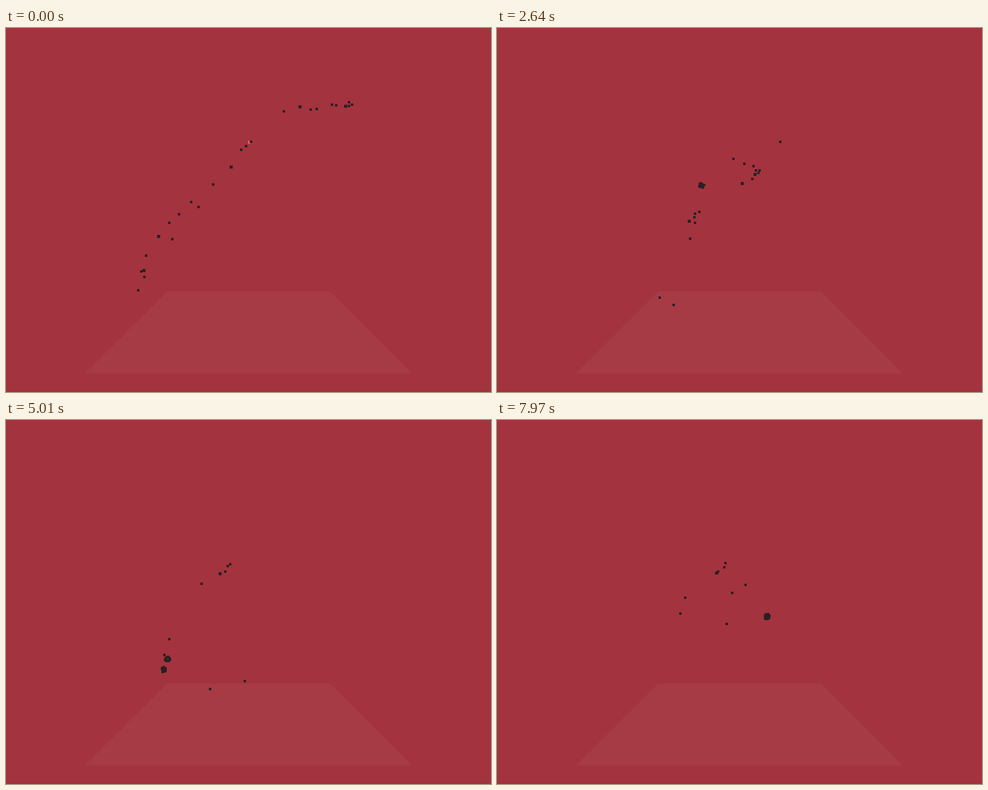
An HTML page with a canvas for the animation above (8 s loop, 796x598 px).

```html
<!DOCTYPE html>
<html lang="en">
<head>
<meta charset="utf-8">
<title>Swarm</title>
<style>
  html, body { margin: 0; width: 100%; height: 100%; overflow: hidden; background: #a3333e; }
  canvas { display: block; }
</style>
</head>
<body>
<canvas width="796" height="598"></canvas>
<script>
const ctx = document.querySelector('canvas').getContext('2d');
const LOOP = 8;
const BEATS = [0, 2.02, 3.23, 4, 4.9, 6.07, 7.97];

// Each group trails behind its head along `spread` and gathers within `settle` seconds.
const groups = [
  { // lead swarm
    count: 8, spread: [-172, 215], bunching: 2, settle: 2.8, orbit: 3.5,
    path: [[400, 187], [355, 226], [311, 297], [261, 359], [254, 408], [351, 378], [444, 322]]
  },
  { // tail swarm
    count: 9, spread: [-114, 9], bunching: 2.5, settle: 4.4, orbit: 3.5, swing: 30,
    path: [[566, 126], [485, 200], [366, 272], [282, 320], [262, 388], [344, 392], [444, 323]]
  },
  { // risers
    count: 4, spread: [-53, 55], settle: 3.3, looseness: 0.3, orbit: 2,
    path: [[303, 286], [322, 312], [345, 283], [369, 255], [369, 238], [367, 224], [376, 236]]
  },
  { // late pair
    count: 2, spread: [-8, 26], looseness: 1,
    path: [[230, 374], [284, 362], [342, 291], [281, 318], [267, 356], [294, 382], [309, 292]]
  },
  // loners
  { path: [[227, 409], [262, 431], [321, 469], [362, 448], [392, 432], [370, 384], [408, 271]] },
  { path: [[217, 431], [250, 443], [284, 440], [306, 433], [332, 442], [357, 434], [377, 335]] },
  { path: [[500, 134], [512, 164], [405, 219], [314, 285], [320, 270], [334, 262], [386, 284]] }
];

const smooth = u => u * u * (3 - 2 * u);

// Cubic Hermite curve through unevenly timed points.
function along(points, t) {
  const last = BEATS.length - 1;
  const slope = (i, axis) => (points[i + 1][axis] - points[i][axis]) / (BEATS[i + 1] - BEATS[i]);
  const tangent = (i, axis) => {
    if (i === 0) return slope(0, axis);
    if (i === last) return slope(last - 1, axis);
    const before = BEATS[i] - BEATS[i - 1], after = BEATS[i + 1] - BEATS[i];
    return (slope(i - 1, axis) * after + slope(i, axis) * before) / (before + after);
  };
  let i = 0;
  while (i < last - 1 && t > BEATS[i + 1]) i++;
  const span = BEATS[i + 1] - BEATS[i];
  const u = Math.min(1, (t - BEATS[i]) / span);
  return [0, 1].map(axis => {
    const a = points[i][axis], b = points[i + 1][axis];
    return a + (b - a) * smooth(u) + span * u * (1 - u) *
      ((1 - u) * tangent(i, axis) - u * tangent(i + 1, axis));
  });
}

function dot(x, y, size, color) {
  ctx.fillStyle = color;
  ctx.fillRect(Math.round(x - size / 2), Math.round(y - size / 2), size, size);
}

function drawGroup(group, t) {
  const { path, count = 1, spread = [0, 0], bunching = 1, settle = 1,
    looseness = 0, orbit = 0, swing = 0 } = group;
  const [x, y] = along(path, t);
  const progress = Math.min(1, t / settle);
  const stretch = Math.max(looseness, 1 - smooth(progress));
  const sway = swing * Math.sin(Math.PI * progress);
  for (let i = 0; i < count; i++) {
    const rank = count > 1 ? (i / (count - 1)) ** bunching : 0;
    const angle = i * 2.4 + t * 0.5;
    const radius = orbit * (0.7 + 0.3 * (i % 3));
    const side = i % 2 ? 1 : -1;
    dot(x + spread[0] * rank * stretch + radius * Math.cos(angle),
      y + spread[1] * rank * stretch + radius * Math.sin(angle) + side * sway * rank,
      i % 4 === 3 ? 5 : 4, '#2a2021');
  }
}

function drawStage() {
  ctx.fillStyle = '#a3333e';
  ctx.fillRect(0, 0, 796, 598);
  ctx.fillStyle = '#9f323d';
  ctx.fillRect(0, 595, 796, 3);
  ctx.fillStyle = '#a63b45';
  ctx.beginPath();
  ctx.moveTo(264, 433);
  ctx.lineTo(532, 433);
  ctx.lineTo(667, 568);
  ctx.lineTo(129, 568);
  ctx.fill();
}

function frame(now) {
  const t = now / 1000 % LOOP;
  drawStage();
  dot(...along(groups[0].path, t), 5, '#ff5660');
  groups.forEach(group => drawGroup(group, t));
  requestAnimationFrame(frame);
}
requestAnimationFrame(frame);
</script>
</body>
</html>
```
